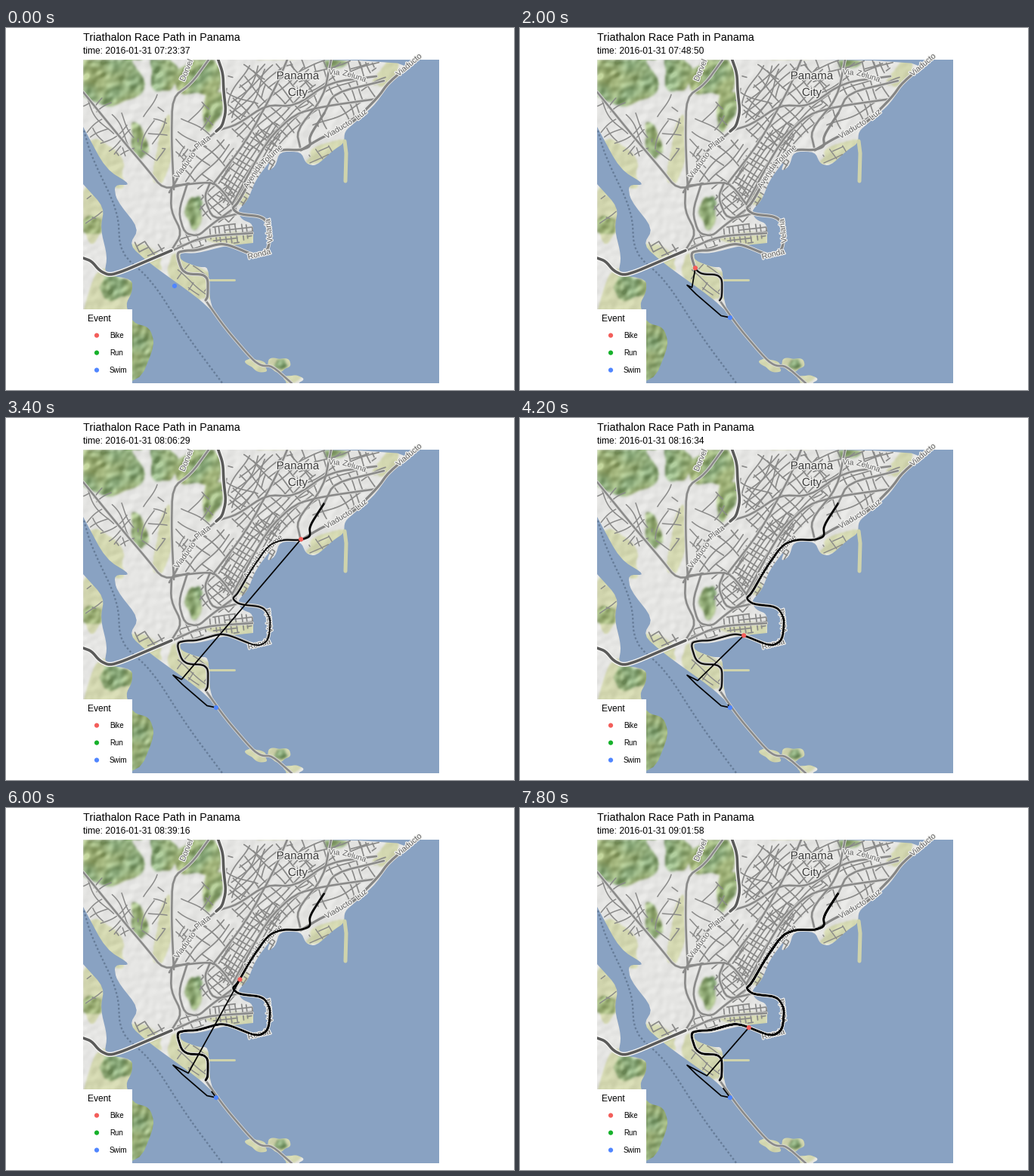
A matplotlib script for the animation above (8 s loop, 672 px wide and 480 px high).

```python
import numpy as np
import matplotlib.pyplot as plt
from matplotlib.animation import FuncAnimation
from matplotlib.collections import LineCollection
from matplotlib.patches import Circle, Rectangle
from matplotlib.path import Path
from matplotlib.patheffects import withStroke

W, H, DPI = 672, 480, 100
PX = 72 / DPI
X0, X1, Y0, Y1 = 102, 573, 42, 471
FRAMES, STEP = 40, 200
BIKE, RUN, SWIM = "#F35E5A", "#17B12B", "#5086FF"
WATER, ROAD, DARK, SAND = "#89A2C2", "#8A8A89", "#5A5A59", "#CFD3AC"
rng = np.random.default_rng(7)

plt.rcParams["font.family"] = "Liberation Sans"
fig = plt.figure(figsize=(W / DPI, H / DPI), dpi=DPI, facecolor="white")
ax = fig.add_axes([0, 0, 1, 1])
ax.axis("off")
frame = Rectangle((X0, Y0), X1 - X0, Y1 - Y0, fc=WATER, ec="none", zorder=0)
ax.add_patch(frame)


def curve(*v, times=2):
    """Corner-cut line through x, y pairs; both ends stay put."""
    p = np.array(v, float).reshape(-1, 2)
    for _ in range(times):
        a, b = p[:-1], p[1:]
        mid = np.stack([0.8 * a + 0.2 * b, 0.2 * a + 0.8 * b], 1)
        p = np.vstack([p[:1], mid.reshape(-1, 2), p[-1:]])
    return p


def oval(x, y, rx, ry, tilt=0, rough=0.12):
    t = np.linspace(0, 2 * np.pi, 50)
    r = 1 + rough * (np.sin(3 * t + x) + 0.6 * np.sin(5 * t + y))
    a = np.radians(tilt)
    u, v = rx * r * np.cos(t), ry * r * np.sin(t)
    return np.c_[x + u * np.cos(a) + v * np.sin(a), y - u * np.sin(a) + v * np.cos(a)]


# ---- land and relief ----
east = curve(102, 42, 541, 42, 507, 71, 491, 99, 462, 125, 448, 137, 447, 153,
             433, 162, 410, 183, 397, 180, 390, 164, 362, 164, 356, 184, 345, 190,
             351, 174, 330, 202, 320, 228, 306, 243, 312, 254, 327, 260, 327, 285)
south = curve(327, 285, 290, 289, 252, 299, 230, 298, 231, 308, 254, 317, 268, 317,
              269, 356, 275, 378, 254, 358, 190, 312, 163, 288, 176, 266,
              146, 228, 143, 208, 166, 208, 132, 187, 102, 131)
west = curve(102, 207, 130, 238, 125, 266, 134, 303, 130, 327, 167, 333, 167, 350,
             158, 367, 168, 391, 190, 397, 197, 420, 176, 471, 102, 471)
islets = [oval(332, 447, 15, 7, -25), oval(361, 446, 15, 9), oval(380, 467, 12, 7)]
land_path = Path.make_compound_path(*[
    Path(np.vstack([s, s[:1]]), closed=True)
    for s in (np.vstack([east, south]), west, *islets)])

h, w = Y1 - Y0, X1 - X0
fy, fx = np.fft.fftfreq(h)[:, None], np.fft.rfftfreq(w)[None]
freq = np.hypot(fx, fy)
gx, gy = np.meshgrid(np.arange(X0, X1) + 0.5, np.arange(Y0, Y1) + 0.5)
cells = np.c_[gx.ravel(), gy.ravel()]


def blur(a, sigma):
    kernel = np.exp(-2 * (np.pi * sigma * freq) ** 2)
    return np.fft.irfft2(np.fft.rfft2(a) * kernel, s=(h, w))


def noise(sigma, low, high):
    n = blur(rng.normal(size=(h, w)), sigma)
    return np.clip(n / n.std(), low, high)[..., None]


def cover(ovals, sigma):
    inside = np.zeros(h * w, bool)
    for o in ovals:
        inside |= Path(oval(*o)).contains_points(cells)
    return np.clip(blur(inside.reshape(h, w).astype(float), sigma), 0, 1)[..., None]


woods = cover([(138, 62, 40, 44, 10), (118, 58, 26, 32), (176, 150, 10, 24, 12),
               (208, 58, 18, 28, 8), (256, 64, 32, 26, 20), (273, 107, 13, 27, -12),
               (249, 244, 11, 22), (112, 262, 16, 12), (146, 344, 23, 16),
               (172, 424, 24, 50), (435, 47, 15, 7), (364, 446, 8, 7)], 1.6)
fields = cover([(132, 178, 38, 18, -55), (208, 165, 10, 46, -8), (428, 163, 34, 11, 22),
                (505, 58, 26, 10, 52), (248, 334, 42, 22, -35), (116, 244, 18, 36),
                (350, 452, 46, 24), (314, 227, 9, 9), (300, 280, 32, 9), (140, 400, 40, 74),
                (188, 302, 24, 10, -40)], 1.2)

height = blur(rng.normal(size=(h, w)), 3.2)
slope = np.gradient(height)
shade = -(slope[0] + slope[1])
shade = np.clip(shade / shade.std(), -2.2, 2.2)[..., None]
relief = np.array([229, 229, 227]) + 3 * shade
for mask, tone in ((fields, np.array([211, 215, 176]) + 4 * shade),
                   (woods, np.array([146, 172, 121]) + 17 * shade
                    + noise(9, -1, 1.5) * np.array([9, 4, 0]))):
    relief = relief * (1 - mask) + tone * mask
img = ax.imshow(np.clip(relief, 0, 255).astype(np.uint8), extent=(X0, X1, Y1, Y0),
                zorder=1, aspect="auto")
img.set_clip_path(land_path, ax.transData)
ax.set_xlim(0, W)
ax.set_ylim(H, 0)


# ---- streets ----
def lines(segs, width, color, z):
    lc = LineCollection(segs, linewidths=width * PX, colors=color, zorder=z,
                        capstyle="round", joinstyle="round")
    ax.add_collection(lc)
    lc.set_clip_path(frame)


def streets(x, y, rx, ry, tilt, angle, du, dv, keep=0.78, bend=1.5, width=1.7):
    """Bent street grid on the land inside an oval, with random gaps."""
    area = Path(oval(x, y, rx, ry, tilt, 0.05))
    c, r, a = np.array([x, y]), max(rx, ry) * 1.1, np.radians(angle)
    u, v = np.array([np.cos(a), -np.sin(a)]), np.array([np.sin(a), np.cos(a)])
    segs = []
    for d, n, gap, run in ((u, v, dv, du), (v, u, du, dv)):
        for off in np.arange(-r, r, gap):
            shift = off + rng.uniform(-0.15, 0.15) * gap
            for s in np.arange(-r, r, 2 * run):
                if rng.random() < keep:
                    t = np.linspace(s, s + 2 * run, 9)[:, None]
                    p = c + t * d + (shift + bend * np.sin(t / 13 + off / 9)) * n
                    p = p[area.contains_points(p) & land_path.contains_points(p)]
                    if len(p) > 1:
                        segs.append(p)
    lines(segs, width, ROAD, 3)


streets(322, 184, 64, 27, 57, 58, 8, 6, 0.92, 0.5)
streets(352, 102, 66, 50, 45, 42, 14, 9)
streets(442, 88, 62, 44, 20, 26, 12, 15, bend=2.5)
streets(314, 82, 40, 28, 64, 64, 18, 12, bend=3)
streets(430, 46, 70, 14, 0, 20, 14, 12)
streets(298, 272, 32, 13, 4, 8, 7, 6, 0.92, 0.4)
streets(282, 234, 26, 26, 0, 42, 10, 9)
streets(245, 282, 20, 12, 10, 20, 10, 8)
streets(248, 334, 30, 18, -38, -38, 17, 9, width=1.4)
streets(192, 293, 24, 10, -15, 30, 12, 8)
streets(134, 130, 48, 26, -50, 35, 13, 11, 0.55, 4, 1.5)
streets(194, 132, 20, 46, 0, 70, 15, 12, 0.5, 4, 1.5)
streets(248, 140, 24, 46, -10, 55, 15, 13, 0.6, 3, 1.5)
streets(266, 180, 40, 30, 30, 48, 15, 12, 0.7, 2)
streets(414, 168, 20, 9, 30, 30, 12, 9, width=1.4)
streets(114, 240, 14, 30, -20, 50, 26, 20, 0.5, 4, 1.4)

course = curve(264, 361, 267, 356, 267, 327, 234, 326, 225, 298, 238, 295, 252, 295,
               282, 286, 296, 288, 332, 303, 347, 295, 350, 266, 340, 250, 308, 247,
               299, 239, 306, 233, 324, 201, 347, 168, 366, 161, 389, 162, 403, 157,
               401, 144, 421, 113, times=3)
major = [
    curve(102, 85, 155, 150, 185, 185, 208, 214, 242, 206),
    curve(268, 42, 245, 74, 220, 92, 219, 150, 222, 214),
    curve(280, 136, 243, 166, 225, 203, 216, 218),
    curve(222, 209, 272, 204, 285, 214, 304, 240),
    curve(219, 212, 218, 242, 233, 272, 218, 296),
    curve(240, 206, 228, 244, 236, 272, 254, 276, 270, 262, 300, 240),
    curve(218, 296, 262, 276, 326, 272),
    curve(270, 205, 262, 225, 274, 254, 308, 246),
    curve(274, 207, 318, 150, 356, 80, 372, 42),
    curve(300, 232, 346, 148, 382, 114, 420, 104, 490, 94),
    curve(280, 136, 306, 128, 344, 102, 382, 104, 428, 72, 490, 64),
    curve(390, 162, 384, 136, 420, 92, 430, 42),
    curve(421, 113, 434, 86, 500, 70),
    curve(264, 361, 290, 398, 326, 440, 338, 448, 352, 448, 378, 471)]
express = curve(390, 162, 418, 145, 456, 128, 492, 92, 506, 72, 545, 40)
lines([[(448, 150), (450, 166), (449, 203)]], 5, SAND, 2)
lines([[(268, 333.5), (302, 333.5)]], 3, SAND, 2)
lines(major, 4.2, "#DCDCDA", 4)
lines(major, 2.6, ROAD, 5)
lines([express, course[:len(course) * 9 // 10]], 5, "#E4E4E2", 5.1)
lines([express, course], 3.2, "#858584", 5.2)

motorways = [
    curve(102, 305, 113, 309, 124, 322, 137, 328, 156, 322, 186, 309, 219, 295),
    curve(280, 40, 287, 60, 288, 85, 291, 110, 286, 130, 278, 137)]
lines(motorways, 6.4, "#F4F4F2", 5.3)
lines(motorways, 3.6, DARK, 5.4)

ferry = curve(103, 136, 113, 170, 148, 243, 151, 298, 193, 335, 240, 409, 287, 472)
ax.plot(*ferry.T, color="#667C98", lw=2.3 * PX, ls=(0, (1.1, 1.2)), zorder=2,
        dash_capstyle="butt")


# ---- labels ----
def place_name(x, y, text, turn=0, size=10.5, color="#606060"):
    t = ax.text(x, y, text, rotation=turn, fontsize=size * PX, color=color, ha="center",
                va="center", zorder=6, rotation_mode="anchor",
                path_effects=[withStroke(linewidth=2.6 * PX, foreground="#F0F0EE")])
    t.set_clip_path(frame)


for item in ((237, 182, "Viaducto", 54), (260, 152, "Plata", 38),
             (327, 196, "Avenida", 57), (352, 168, "Tolume", 42),
             (335, 300, "Ronda", 14), (348, 269, "Velaria", 97),
             (434, 59, "Via", -4), (461, 64, "Zeluna", -17),
             (440, 134, "Viaducto", 31), (470, 115, "Luz", 40),
             (533, 49, "Viaducto", 40), (239, 56, "Dorvel", 68)):
    place_name(*item)
place_name(386, 64, "Panama", size=15.2, color="#3C3C3C")
place_name(386, 86, "City", size=15.2, color="#3C3C3C")


def label(x, y, text, size):
    return ax.text(x, y, text, fontsize=size * PX, color="black", va="baseline", zorder=12)


def dot(x, y, color):
    return ax.add_patch(Circle((x, y), 3.1, fc=color, ec="none", zorder=11))


label(102, 17, "Triathalon Race Path in Panama", 14.4)
clock = label(102, 34, "", 12)
ax.add_patch(Rectangle((102, 373), 65, 98, fc="white", ec="none", zorder=10))
label(108, 389, "Event", 12)
for i, (name, color) in enumerate((("Bike", BIKE), ("Run", RUN), ("Swim", SWIM))):
    dot(120, 407.6 + 23 * i, color)
    label(137, 411 + 23 * i, name, 9.6)


# ---- race ----
def arc(p):
    return np.r_[0, np.cumsum(np.hypot(*np.diff(p, axis=0).T))]


def along(p, s):
    d = arc(p)
    return np.c_[np.interp(s, d, p[:, 0]), np.interp(s, d, p[:, 1])]


def mark(x, y):
    return arc(course)[np.argmin(np.hypot(*(course - (x, y)).T))]


finish = arc(course)[-1]
bike_t = [9, 14, 16.1, 21, 24.1, 30, 32.5, 35, 38.1, 39]
bike_s = [0, mark(324, 201), finish, mark(297, 288), 0, mark(309, 226), finish,
          mark(314, 217), mark(248, 296), mark(303, 291)]
swim = curve(223, 342, 221, 341, 233, 353, 266, 381.5, 278, 384, times=0)
swim_d = arc(swim)
swim_t, swim_s = [0, 6, 7.6], [0, swim_d[-2] - 1, swim_d[-1]]

trail, = ax.plot([], [], color="black", lw=1.7 * PX, zorder=8, solid_joinstyle="round")
bike_dot, swim_dot = dot(0, 0, BIKE), dot(0, 0, SWIM)


def ride(k):
    t = np.linspace(bike_t[0], k, int((k - bike_t[0]) * 45))
    s = np.interp(t, bike_t, bike_s)
    # riders coming back keep to the other side of the road
    return along(course, s) + 0.3 * np.sign(np.gradient(s))[:, None]


def update(k):
    secs = 7 * 3600 + 23 * 60 + 37 + int(k * 151.31)
    clock.set_text(f"time: 2016-01-31 {secs // 3600:02d}:{secs // 60 % 60:02d}:{secs % 60:02d}")
    s = np.interp(k, swim_t, swim_s)
    swimmer = along(swim, [s])
    path = np.vstack([swim[swim_d < s], swimmer])
    swim_dot.center = swimmer[0]
    biking = k > bike_t[0]
    bike_dot.set_visible(biking)
    if biking:
        rode = ride(k)
        bike_dot.center = rode[-1]
        start = (220.7 + 0.68 * k, 340.2 + 0.38 * k)
        u = np.clip((k - 14) / 25, 0, 1)
        tail = (278 - 9 * u, 384 - 12 * u)
        path = np.vstack([rode, start, swim[1:], tail])
    trail.set_data(path[:, 0], path[:, 1])
    return clock, trail, bike_dot, swim_dot


def reset():
    return update(0)


anim = FuncAnimation(fig, update, frames=FRAMES, init_func=reset, interval=STEP,
                     repeat=True, repeat_delay=0, blit=False)
plt.show()
```
